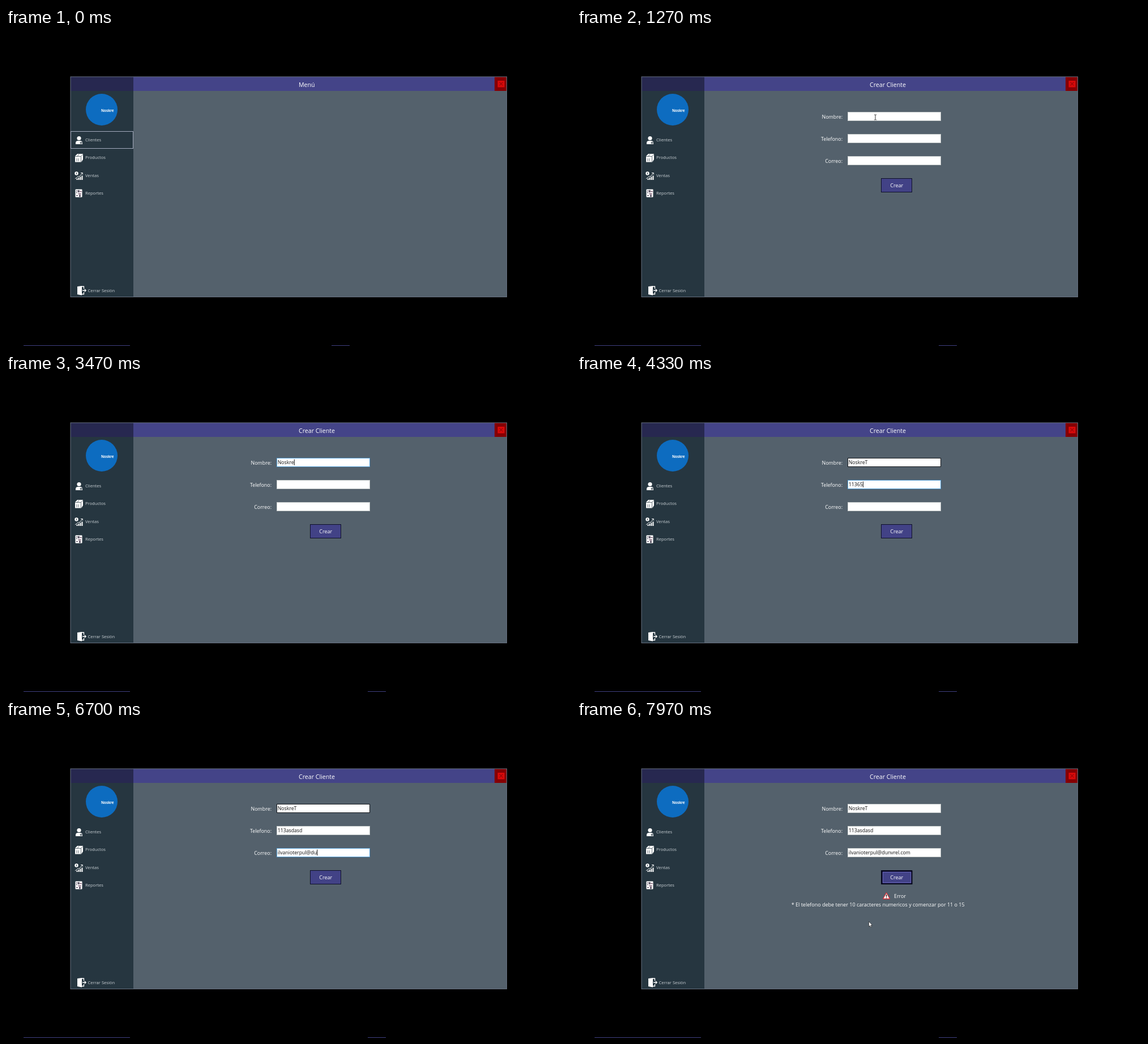
Recreate the animation shown at these times as an HTML page. Size 998 by 561 pixels, loop 8 s.

```html
<!DOCTYPE html>
<html lang="es">
<head>
<meta charset="utf-8">
<title>Menú</title>
<style>
  html, body { margin: 0; height: 100%; overflow: hidden; background: #000; }
  svg { display: block; width: 100vw; height: 100vh; font-family: "Open Sans", "Noto Sans", sans-serif; fill: #fff; }
  .side { font-size: 7.6px; fill: #c9d0d4; }
  .big { font-size: 9.3px; text-anchor: middle; }
  .label { font-size: 8.9px; text-anchor: end; }
  .entry { font-size: 8.7px; fill: #111; white-space: pre; }
  .button { fill: #424286; stroke: #0e0f2a; }
  .item { fill: none; }
  .item.hover { fill: #454589; }
  .item.focus { stroke: #a3aabd; }
  .line { fill: none; stroke: #fff; }
</style>
</head>
<body>
<svg viewBox="0 0 998 561">
  <rect width="998" height="561" fill="#000"/>
  <rect x="31" y="560" width="188" height="1" fill="#424286"/>
  <rect id="task" y="560" width="32" height="1" fill="#424286"/>

  <!-- window -->
  <rect x="114" y="86" width="770" height="388" fill="#54616c"/>
  <rect x="114" y="86" width="111" height="388" fill="#263640"/>
  <rect x="114" y="86" width="111" height="25" fill="#272850"/>
  <rect x="225" y="86" width="638" height="25" fill="#444488"/>
  <rect x="863" y="86" width="21" height="25" fill="#850004"/>
  <rect x="868.5" y="93" width="12" height="11.5" fill="#d90a0a"/>
  <path d="M871.5 95.5l6 6m0-6l-6 6" stroke="#9c0508" stroke-width="1.2"/>
  <rect x="114" y="86" width="770.5" height="388.5" fill="none" stroke="#667080"/>
  <text id="title" x="517" y="103.8" font-size="10.6"></text>
  <circle cx="169" cy="144" r="28" fill="#0d6cc0"/>
  <text x="168" y="148" font-size="6.3" font-weight="700">Noskre</text>

  <!-- sidebar -->
  <g id="items"></g>
  <g>
    <circle cx="129" cy="194.5" r="3.6"/>
    <path d="M123 205v-2q0-4 4-4h4q4 0 4 4v2z"/>
    <circle cx="132.6" cy="202.6" r="1.8" fill="#263640"/>
    <circle cx="132.6" cy="202.6" r="0.8"/>
  </g>
  <g>
    <path d="M122 226l4-4h10v10l-3 4.5h-11z"/>
    <path d="M122 226.5h10.500v10m0-10l3.500-4M129 222.500l-3 4M125 230v5m3-5v5" fill="none" stroke="#263640" stroke-width=".7"/>
  </g>
  <g>
    <circle cx="124.500" cy="256.500" r="3.200"/>
    <path d="M124.500 254.800v3.400" stroke="#263640"/>
    <path d="M124.500 265.500h2v2.500h-2zM127.500 264h2v4h-2zM130.500 262.500h2v5.500h-2zM133.500 260.500h2v7.500h-2z"/>
    <path class="line" d="M122 266l5-4 3 0 5-6.500m-3 0h3.300v3" stroke-width=".9"/>
  </g>
  <g>
    <rect x="122.500" y="284.500" width="12" height="14" rx="1"/>
    <path d="M124 287.500h3m-3 3h2m-2 5h3" stroke="#3a2b45" stroke-width="1.200"/>
    <path d="M128.500 286v4m2 4v4" stroke="#2c2438" stroke-width="2"/>
    <path d="M130.500 288.500h3m-6 4h5" stroke="#6b4560" stroke-width="1.600"/>
  </g>
  <g>
    <path d="M126 456l8-1v16.500l-8-1.500z"/>
    <path class="line" d="M133 456h4.500v4m0 6v3.500h-4.500M135 463h6m-2.200-2.400l2.400 2.400-2.400 2.400" stroke-width="1.300"/>
  </g>
  <g class="side">
    <text x="140" y="200.2">Clientes</text>
    <text x="140" y="231.4">Productos</text>
    <text x="140" y="262.5">Ventas</text>
    <text x="140" y="293.7">Reportes</text>
    <text x="144.5" y="465.7">Cerrar Sesión</text>
  </g>

  <g id="menu" class="big">
    <rect class="button" x="479.5" y="210.5" width="155" height="37.5"/>
    <rect class="button" x="479.5" y="252" width="155" height="40"/>
    <rect class="button" x="479.5" y="296" width="155" height="40"/>
    <text x="556" y="232.7">Crear Cliente</text>
    <text x="556" y="275.5">Baja - Modificacion Clientes</text>
    <text x="556" y="319.5">Buscador de clientes</text>
  </g>

  <g id="form">
    <g id="fields"></g>
    <rect class="button" x="537.5" y="265.5" width="54" height="24"/>
    <g id="pressed" fill="none">
      <rect x="538.5" y="266.5" width="53" height="22.5" stroke="#05051a" stroke-width="2"/>
      <rect x="540.5" y="268.5" width="49" height="18.5" stroke="#6461b4"/>
    </g>
    <text class="big" x="564.7" y="281.3" style="font-size:9px">Crear</text>
    <g id="error">
      <path d="M546.5 304.8l6 10.7h-12z" stroke="#d3343c" stroke-width="1.3" stroke-linejoin="round"/>
      <path d="M546.5 308v4m0 1v1.3" stroke="#111" stroke-width="1.3"/>
      <text x="560" y="313.8" font-size="8.8">Error</text>
      <text class="big" x="531.7" y="329.3" style="font-size:9px">* El telefono debe tener 10 caracteres numericos y comenzar por 11 o 15</text>
    </g>
  </g>

  <g id="pointer">
    <path id="arrow" d="M0 0v9l2-1.800 1.400 3 1.400-.6-1.400-3h2.700z" stroke="#111" stroke-width=".6"/>
    <path id="hand" d="M-1 0q1-1 2 0v4l4 1q1 .3 1 2l-1 4.500h-5l-3.500-4.500q0-1.200 1.200-.8l1.300 1z" stroke="#111" stroke-width=".6"/>
    <path id="beam" d="M-2-4.500h1.500l.5.500.5-.5h1.500M0-4v8M-2 4.500h1.500l.5-.5.5.5h1.500" fill="none" stroke="#222" stroke-width=".9"/>
  </g>
</svg>
<script>
const $ = id => document.getElementById(id);
const show = (id, on) => $(id).style.display = on ? "" : "none";

function add(parent, tag, attrs, text = "") {
  const el = document.createElementNS("http://www.w3.org/2000/svg", tag);
  for (const k in attrs) el.setAttribute(k, attrs[k]);
  el.textContent = text;
  return parent.appendChild(el);
}

const LOOP = 8000, OPEN_MENU = 450, OPEN_FORM = 1080, FIRST_KEY = 2050, SHOW_MOUSE = 7280, SUBMIT = 7640;
const FOCUS = [1460, 3640, 5420, SUBMIT];
const NAME = "NoskreT", MAIL = "ilvanioterpul@dunvrel.com";

// time, x, y
const PATH = [
  [60, 600, 561], [420, 203.5, 195], [600, 203.5, 195], [930, 545, 230], [1080, 545, 230], [1250, 527, 157.5],
  [SHOW_MOUSE, 527, 157.5], [7560, 565, 280], [7680, 565, 280], [7940, 515.5, 355.5]
];

const items = [0, 1, 2, 3].map(i => {
  const y = 182 + 31 * i;
  return { y, el: add($("items"), "rect", { x: 114.5, y: y + .5, width: 110, height: 30 }) };
});

const fields = ["Nombre:", "Telefono:", "Correo:"].map((label, i) => {
  const y = 148 + 39 * i, g = $("fields");
  add(g, "text", { class: "label", x: 469, y: y + 11.5 }, label);
  return {
    box: add(g, "rect", { x: 478.5, y: y + .5, width: 164, height: 15 }),
    text: add(g, "text", { class: "entry", x: 479.8, y: y + 10.7 }),
    caret: add(g, "rect", { y: y + 2.5, width: 1, height: 10.5, fill: "#111" })
  };
});

// keys pressed so far when n keys fall evenly between a and b
const keys = (t, n, a, b) => t < a ? 0 : Math.min(n, 1 + Math.floor((t - a) / (b - a) * (n - 1)));

const entries = [
  t => t < 2480 ? "M".slice(0, keys(t, 1, FIRST_KEY, FIRST_KEY + 1)) : NAME.slice(0, keys(t, 7, 2650, 3500)),
  t => t < 4550 ? "11365".slice(0, keys(t, 5, 3780, 4290))
    : t < 4660 ? "1136" : "113" + "asdasd".slice(0, keys(t, 6, 4760, 5230)),
  t => MAIL.slice(0, keys(t, 16, 5600, 6660) + keys(t, 9, 6830, 7130))
];

function mouseAt(t) {
  const i = PATH.findIndex(p => p[0] > t);
  if (i < 1) return PATH[i ? PATH.length - 1 : 0].slice(1);
  const [a, x0, y0] = PATH[i - 1], [b, x1, y1] = PATH[i];
  const u = (t - a) / (b - a), e = u * u * (3 - 2 * u);
  return [x0 + (x1 - x0) * e, y0 + (y1 - y0) * e];
}

function drawMouse(t, inMenu, inForm) {
  const [x, y] = mouseAt(t);
  const within = (l, top, r, bottom) => x >= l && x < r && y >= top && y < bottom;
  const hand = within(114, 182, 225, 306) || inMenu && within(479, 210, 634, 336) || inForm && within(537, 265, 592, 290);
  const beam = inForm && [148, 187, 226].some(top => within(478, top, 643, top + 16));
  $("pointer").setAttribute("transform", `translate(${x} ${y})`);
  show("pointer", t > 60 && t < FIRST_KEY || t > SHOW_MOUSE);
  show("hand", hand);
  show("beam", beam);
  show("arrow", !hand && !beam);
  items.forEach(({ y: top, el }, i) => {
    const hover = within(114, top, 225, top + 31);
    el.setAttribute("class", "item" + (hover ? " hover" : i == 0 && t < OPEN_MENU ? " focus" : ""));
  });
  return beam;
}

function draw(t) {
  const inForm = t >= OPEN_FORM, inMenu = t >= OPEN_MENU && !inForm;
  $("title").textContent = inForm ? "Crear Cliente" : inMenu ? "Menú Clientes" : "Menú";
  $("task").setAttribute("x", t < OPEN_MENU ? 575 : 639);
  show("menu", inMenu);
  show("form", inForm);
  show("pressed", t >= SUBMIT);
  show("error", t >= SUBMIT + 40);
  const overField = drawMouse(t, inMenu, inForm);

  fields.forEach(({ box, text, caret }, i) => {
    const focused = t >= FOCUS[i] && t < FOCUS[i + 1];
    const hovered = i == 0 && overField && t > 1300;
    box.setAttribute("stroke", focused ? "#5aa5dc" : hovered ? "#15181c" : "#c3c8c8");
    text.textContent = entries[i](t);
    caret.setAttribute("x", 480 + text.getComputedTextLength());
    caret.style.display = focused && !(t > 1750 && t < FIRST_KEY) ? "" : "none";
  });
}

function tick() {
  draw(performance.now() % LOOP);
  requestAnimationFrame(tick);
}
tick();
</script>
</body>
</html>
```
